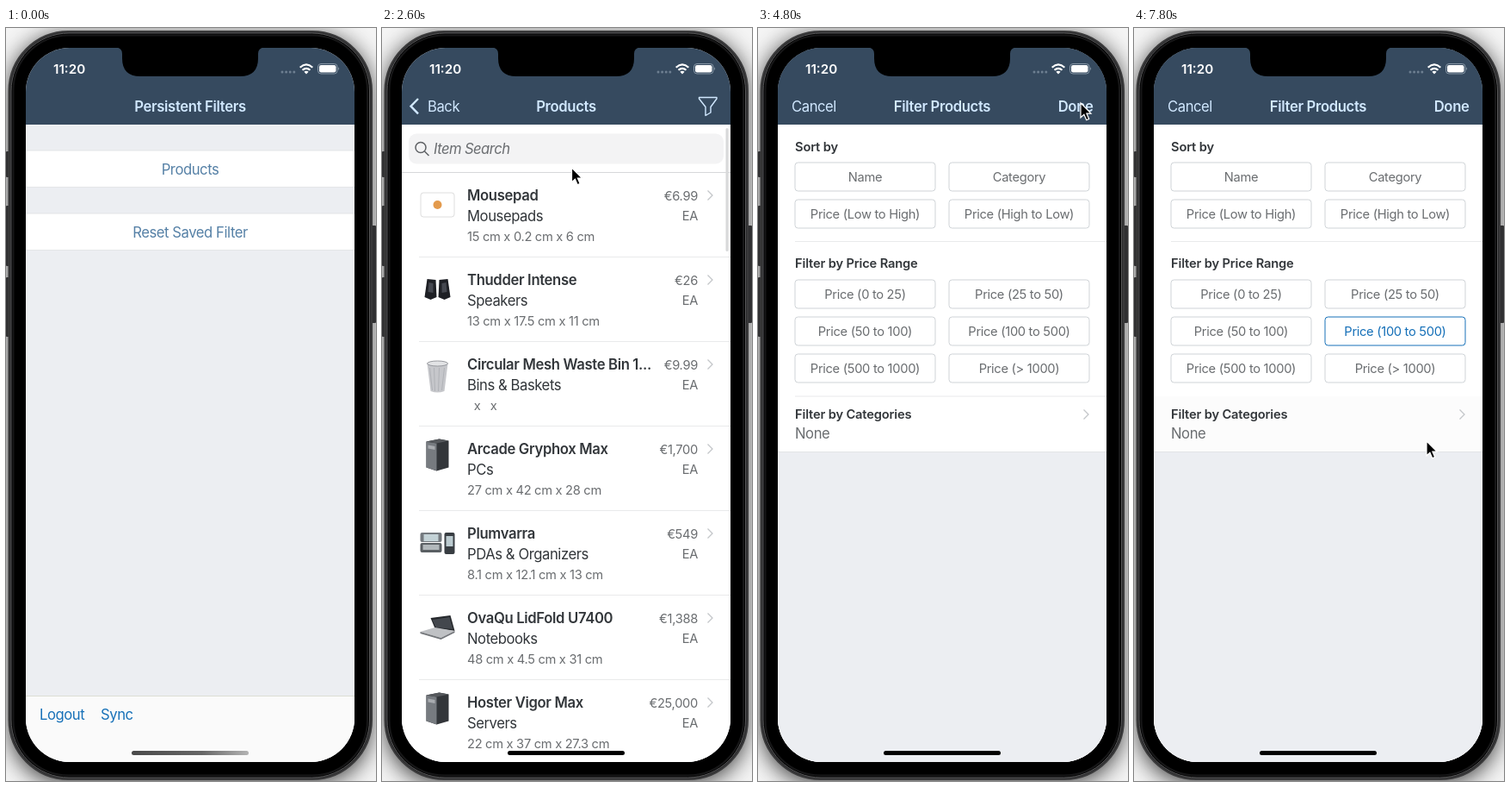
An HTML page for the animation above (8 s loop, 430 by 873 pixels).

```html
<!DOCTYPE html>
<html lang="en">
<head>
<meta charset="utf-8">
<title>Persistent filters demo</title>
<style>
  html, body { margin: 0; width: 100%; height: 100%; overflow: hidden; background: #efefef; }
  svg { display: block; }
  text { font: 400 16.65px Inter, sans-serif; letter-spacing: -.026em; fill: #32363a; white-space: pre; }
  .semi { font-weight: 600; letter-spacing: -.02em; }
  .small { font-size: 14.7px; letter-spacing: -.021em; }
  .small.semi { letter-spacing: -.011em; }
  .grey { fill: #6a6d70; }
  .bar { fill: #d1e8ff; }
  .link { fill: #5580a6; }
  .tool { fill: #1670b8; }
  .mid { text-anchor: middle; }
  .end { text-anchor: end; }
  .button rect { fill: #fff; stroke: #cfd3d7; }
  .button.on rect { stroke: #1670b8; }
  .button.on text { fill: #1670b8; }
  #hint { font-style: italic; letter-spacing: -.034em; }
  #clock { fill: #fff; font-size: 15.2px; letter-spacing: 0; }
</style>
</head>
<body>
<svg id="stage" width="430" height="873" viewBox="0 0 430 873"></svg>
<script>
const LOOP = 8000, STEP = 200;
const NAVY = '#364a5f', PAGE = '#eceef2';

const text = (x, y, label, cls = '', id = '') =>
  `<text x="${x}" y="${y}" class="${cls}" ${id && `id="${id}"`}>${label}</text>`;
const rect = (x, y, w, h, fill, more = '') =>
  `<rect x="${x}" y="${y}" width="${w}" height="${h}" fill="${fill}" ${more}/>`;
const path = (d, fill, more = '') => `<path d="${d}" fill="${fill}" ${more}/>`;
const line = (y, x = 43, color = '#e9eaeb') => rect(x, y, 405 - x, 1, color);
const chevron = y => path(`M378.5 ${y - 5.5}l5.500 5.500-5.500 5.500`, 'none', 'stroke="#c3c6c9" stroke-width="1.300"');

// Thumbnails are drawn around their own centre.
const thumbs = {
  pad: rect(-19.5, -14, 39, 28, '#fff', 'rx="3" stroke="#dedede"') + '<circle r="5" fill="#e39a4c"/>',
  speakers: path('M-12-12L-2-11-1 9-8 12-15 9Z', '#1e2025') + path('M2-11L12-12 15 9 8 12 1 9Z', '#1e2025') +
    path('M-10-8l5 1v11l-6-1zM5-7l5-1 1 11-6 1z', '#454850'),
  bin: path('M-12-15H12L8 17Q0 20-8 17Z', '#c6c7cb') +
    path('M-9-10L-6 16M-4-10L-3 17M2-10L1 17M8-10L5 16', 'none', 'stroke="#b0b2b7"') +
    '<ellipse cy="-15" rx="12" ry="3" fill="#e2e3e5" stroke="#97999e"/>',
  tower: path('M-13-16L2-19 13-17V14L-1 18-13 14Z', '#33363a') + path('M-13-16L-1-14V18L-13 14Z', '#777b80') +
    path('M-11-12l8 1.500v4l-8-1.500z', '#a9acb0') + path('M-13-16L2-19 13-17-1-14Z', '#55585c'),
  organizer: rect(-20, -12, 25, 11, '#74797e', 'rx="2"') + rect(-16, -10, 17, 8, '#c3d2d6') +
    rect(-20, 0, 25, 11, '#5a5f63', 'rx="2"') + rect(-17, 2, 19, 6, '#b2b8bb') +
    rect(8, -12, 12, 25, '#383d42', 'rx="2"') + rect(10, -8, 8, 12, '#bccbd0'),
  laptop: path('M-8-11L15-14 20 4-3 1Z', '#24272b') + path('M-6-9L14-12 18 2-2 0Z', '#43474d') +
    path('M-20 5L-3 0 20 4 4 12Z', '#bfc1c4') + path('M-20 5L4 12 20 4V6L4 14-20 7Z', '#74777b')
};

const products = [
  ['Mousepad', 'Mousepads', '15 cm x 0.2 cm x 6 cm', '€6.99', 'pad'],
  ['Thudder Intense', 'Speakers', '13 cm x 17.5 cm x 11 cm', '€26', 'speakers'],
  ['Circular Mesh Waste Bin 1...', 'Bins &amp; Baskets', '  x   x', '€9.99', 'bin'],
  ['Arcade Gryphox Max', 'PCs', '27 cm x 42 cm x 28 cm', '€1,700', 'tower'],
  ['Plumvarra', 'PDAs &amp; Organizers', '8.1 cm x 12.1 cm x 13 cm', '€549', 'organizer'],
  ['OvaQu LidFold U7400', 'Notebooks', '48 cm x 4.5 cm x 31 cm', '€1,388', 'laptop'],
  ['Hoster Vigor Max', 'Servers', '22 cm x 37 cm x 27.3 cm', '€25,000', 'tower']
];
const thumbDrop = { tower: 34.5, bin: 41 };
const productRow = ([name, kind, size, price, thumb], i) => {
  const y = 167 + 98 * i;
  return `<g transform="translate(64.500 ${y + (thumbDrop[thumb] || 38)})">${thumbs[thumb]}</g>` +
    text(99, y + 32.5, name, 'semi') + text(99, y + 56.5, kind) + text(99, y + 79.5, size, 'small grey') +
    text(367, y + 32.5, price, 'small grey end') + text(367, y + 56, 'EA', 'small grey end') +
    chevron(y + 27) + line(y + 98);
};

const button = (col, y, label, id = '') => {
  const x = col ? 221.5 : 42.5;
  return `<g class="button" ${id && `id="${id}"`}>${rect(x + .5, y, 163, 33, '#fff', 'rx="3.500"')}` +
    text(x + 82, y + 22, label, 'small grey mid') + '</g>';
};

const home = rect(23, 112, 382, 740, PAGE) +
  [142, 215].map(y => rect(23, y, 382, 42, '#fff') + line(y - .5, 23, '#e4e6e8') + line(y + 42, 23, '#e4e6e8')).join('') +
  text(214, 169.5, 'Products', 'link mid', 'open') + text(214, 242.5, 'Reset Saved Filter', 'link mid') +
  rect(23, 775, 382, 77, '#fafafa') + line(774, 23, '#dcddd4') +
  text(39, 802, 'Logout', 'tool') + text(110, 802, 'Sync', 'tool');

const list = rect(23, 112, 382, 740, '#fff') +
  rect(31, 122.5, 366, 35, '#f3f3f4', 'rx="9"') +
  '<g fill="none" stroke="#5f6265" stroke-width="1.500"><circle cx="45" cy="138.500" r="6"/><path d="M49.500 143l5 5"/></g>' +
  text(60, 146, 'Item Search', 'grey', 'hint') + line(167, 23, '#d6d8da') +
  products.map(productRow).join('') + rect(399.5, 116, 3, 143, '#d8d9da', 'rx="1.500" id="scroll"');

const filters = rect(23, 112, 382, 379, '#fff') + rect(23, 427, 382, 64, '#fcfcfc', 'id="pressed"') +
  text(43, 142.5, 'Sort by', 'small semi') +
  button(0, 156, 'Name') + button(1, 156, 'Category') +
  button(0, 199, 'Price (Low to High)') + button(1, 199, 'Price (High to Low)') + line(247) +
  text(43, 278, 'Filter by Price Range', 'small semi') +
  button(0, 292, 'Price (0 to 25)') + button(1, 292, 'Price (25 to 50)') +
  button(0, 335, 'Price (50 to 100)') + button(1, 335, 'Price (100 to 500)', 'choice') +
  button(0, 378, 'Price (500 to 1000)') + button(1, 378, 'Price (&gt; 1000)') +
  `<g id="divider">${line(426.5)}</g>` +
  text(43, 453, 'Filter by Categories', 'small semi') + text(43, 476, 'None', 'grey') +
  chevron(448) + line(491, 23, '#e2e4e6');

const statusBar = text(55, 52.5, '11:20', 'semi', 'clock') +
  [0, 1, 2, 3].map(i => `<circle cx="${321 + 4.6 * i}" cy="51" r="1.500" fill="#6d7f91"/>`).join('') +
  '<g fill="none" stroke="#fff" stroke-width="2.200"><path d="M341.700 45.700q7.300-6.600 14.600 0M344.500 48.800q4.500-4 9 0"/></g>' +
  path('M349 53.500l-2.600-2.700q2.600-2 5.200 0z', '#fff') +
  rect(362.5, 41.500, 22.5, 11.500, 'none', 'rx="3.500" stroke="#8797a6"') +
  rect(364, 43, 19.5, 8.500, '#fff', 'rx="2.200"') + path('M386.200 45.500q2 1.700 0 3.500z', '#8797a6');

const stage = document.getElementById('stage');
stage.innerHTML = `
  <defs>
    <clipPath id="screen"><rect x="23" y="23" width="382" height="828" rx="51"/></clipPath>
    <linearGradient id="fade"><stop stop-color="#4a4a4a"/><stop offset=".6" stop-color="#666"/><stop offset="1" stop-color="#b4b4b4"/></linearGradient>
    <filter id="blur" x="-20%" y="-20%" width="140%" height="140%"><feGaussianBlur stdDeviation="13"/></filter>
  </defs>
  ${rect(0, 0, 430, 873, '#f4f4f4')}
  ${rect(4, 8, 420, 868, '#000', 'rx="66" opacity=".75" filter="url(#blur)"')}
  ${[[0, 143, 30], [0, 206, 70], [0, 289, 69], [425, 229, 113]].map(([x, y, h]) => rect(x, y, 5, h, '#303032', 'rx="1"')).join('')}
  ${rect(3.5, 4, 421.5, 867, '#29292b', 'rx="69" stroke="#3a3a3b" stroke-width="2"')}
  ${rect(6, 6, 416.5, 863, '#000', 'rx="67" stroke="#59595a"')}
  ${rect(8.5, 8.5, 411.5, 858, '#000', 'rx="64" stroke="#171718" stroke-width="2"')}
  <g clip-path="url(#screen)">
    ${rect(23, 23, 382, 828, PAGE)}
    <g id="home">${home}</g>
    <g id="products">${rect(23, 112, 382, 740, PAGE)}<g id="list">${list}</g></g>
    ${rect(23, 23, 382, 89, NAVY)}
    ${text(214, 96.5, 'Persistent Filters', 'bar semi mid', 'homeTitle')}
    ${text(214, 96.5, 'Products', 'bar semi mid', 'listTitle')}
    <g id="navItems">
      ${path('M42 82l-8.500 8.700 8.500 8.700', 'none', 'stroke="#d1e8ff" stroke-width="2.400"')}
      ${text(53, 96.5, 'Back', 'bar')}
      ${path('M368.500 80.500H389V82L382 91.500V98L376 101.500V91.500L368.500 82Z', 'none', 'stroke="#d1e8ff" stroke-width="1.400" stroke-linejoin="round"')}
    </g>
    <g id="sheet">
      ${rect(23, 23, 382, 89, NAVY)}${rect(23, 112, 382, 740, PAGE)}
      ${text(39, 96.5, 'Cancel', 'bar')}${text(214, 96.5, 'Filter Products', 'bar semi mid')}${text(389.5, 96.5, 'Done', 'bar semi end')}
      <g id="filters">${filters}</g>
    </g>
    ${statusBar}
    ${rect(146, 838, 136, 5, '#000', 'rx="2.500" id="indicator"')}
  </g>
  ${path('M128 22.500Q135 23 135 30V35Q135 56 156 56H272Q293 56 293 35V30Q293 23 300 22.500Z', '#000')}
  <g id="cursor">${path('M0 0V16.800L3.900 13.200 6.700 19.700 9.700 18.400 6.900 12.100H12Z', '#000', 'stroke="#fff" stroke-width="1.200"')}</g>`;

const el = id => document.getElementById(id);
const clamp = v => Math.min(1, Math.max(0, v));
const progress = (t, start, length) => clamp((t - start) / length);
const smooth = p => p * p * (3 - 2 * p);
const show = (id, on) => { el(id).style.display = on ? '' : 'none'; };
const move = (id, x, y = 0) => el(id).setAttribute('transform', `translate(${x} ${y})`);
const fade = (id, value) => { el(id).style.opacity = value; };

// Pointer stops: time, x, y
const stops = [
  [1800, 220.5, 162], [2900, 220.5, 162], [3900, 375, 87], [4900, 375, 87],
  [5700, 378, 370], [5850, 378, 370], [6300, 328, 348], [6800, 328, 348], [7500, 340, 479], [LOOP, 340, 479]
];
function pointer(t) {
  const next = Math.max(1, stops.findIndex(s => s[0] > t));
  const [t0, x0, y0] = stops[next - 1], [t1, x1, y1] = stops[next];
  const p = smooth(progress(t, t0, t1 - t0));
  return [x0 + (x1 - x0) * p, y0 + (y1 - y0) * p];
}

function draw(t) {
  const push = 1 - (1 - progress(t, 2060, 330)) ** 2;
  move('home', -115 * push);
  move('products', 382 * (1 - push));
  move('homeTitle', -130 * push);
  move('listTitle', 170 * (1 - push));
  fade('homeTitle', 1 - push);
  fade('listTitle', push);
  fade('navItems', push);
  show('home', push < 1);
  el('open').style.fill = t >= 1800 ? '#a4c6e2' : '';
  el('indicator').setAttribute('fill', push < .5 ? 'url(#fade)' : '#000');

  show('list', t >= 2600);
  fade('scroll', 1 - progress(t, 3000, 300));

  const rise = 1 - (1 - progress(t, 4262.5, 405)) ** 3;
  move('sheet', 0, 828 * (1 - rise));
  show('filters', t >= 4800);
  el('choice').classList.toggle('on', t >= 6600);
  show('pressed', t >= 7800);
  show('divider', t < 7800);

  show('cursor', t >= 1800);
  move('cursor', ...pointer(t));
}

function tick() {
  const t = performance.now() % LOOP;
  draw(Math.floor(t / STEP) * STEP);
  requestAnimationFrame(tick);
}
tick();
</script>
</body>
</html>
```
